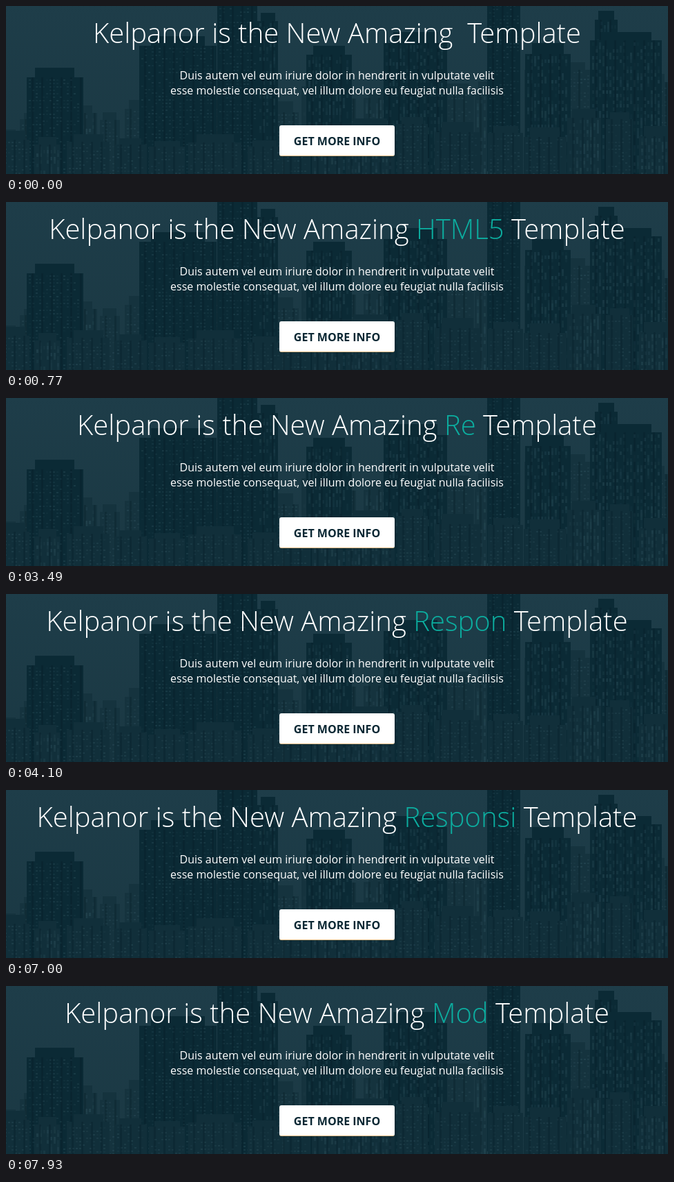
Write an HTML page with a canvas that moves like this. It is 959 px wide and 245 px high and loops after 8 s.

```html
<!DOCTYPE html>
<html lang="en">
<head>
<meta charset="utf-8">
<title>Banner with a typed word</title>
<style>
  html, body { margin: 0; width: 100%; height: 100%; overflow: hidden; }
  body { position: relative; background: #1c3a46; color: #fff; font-family: "Open Sans", sans-serif; }
  canvas { position: absolute; left: 0; top: 0; }
  h1, p, .button { position: absolute; margin: 0; text-align: center; white-space: pre; }
  h1 { left: 0; top: 11px; width: 959px; font-size: 40px; font-weight: 300; line-height: 55px; }
  h1 span { color: #0cad9f; }
  p { left: 0; top: 90px; width: 959px; font-size: 16px; line-height: 22px; }
  .button {
    left: 396px; top: 174px; width: 167px; height: 45px; box-sizing: border-box;
    border-bottom: 1px solid #e5bd85; border-radius: 3px;
    background: #fff; color: #0a2733; font-size: 16px; font-weight: 700; line-height: 46px;
  }
</style>
</head>
<body>
<canvas id="city" width="959" height="245"></canvas>
<h1>Kelpanor is the New Amazing <span id="word"></span> Template</h1>
<p>Duis autem vel eum iriure dolor in hendrerit in vulputate velit
esse molestie consequat, vel illum dolore eu feugiat nulla facilisis</p>
<div class="button">GET MORE INFO</div>
<script>
const WIDTH = 959, HEIGHT = 245, LOOP = 8000;

// Letters appear every `pace` ms; erasing begins with `left` letters and runs down evenly.
const WORDS = [
  { text: 'HTML5', from: 150, pace: 153, erase: 3020, left: 2, gone: 3180 },
  { text: 'Responsive', from: 3330, pace: 153, erase: 7000, left: 8, gone: 7390 },
  { text: 'Mod', from: 7540, pace: 190, erase: LOOP, left: 0, gone: LOOP }
];

function typedText(time) {
  const word = WORDS.findLast(({ from }) => time >= from);
  if (!word || time >= word.gone) return '';
  const { text, from, pace, erase, left, gone } = word;
  const count = time < erase
    ? Math.floor((time - from) / pace) + 1
    : Math.ceil(left * (gone - time) / (gone - erase));
  return text.slice(0, count);
}

function seededRandom(seed) {
  return () => (seed = (seed * 16807) % 2147483647) / 2147483647;
}

function drawCity(g) {
  const random = seededRandom(29);
  const between = (low, high) => low + random() * (high - low);
  const rect = (color, x, y, w, h) => {
    g.fillStyle = color;
    g.fillRect(Math.round(x), Math.round(y), Math.round(w), Math.round(h));
  };

  function tower(x, top, width, color) {
    const step = between(8, 16);
    rect(color, x + width * .15, top, width * .7, HEIGHT);
    rect(color, x, top + step, width, HEIGHT);
    const vertical = random() < .4;
    for (let y = top + step + 3; y < HEIGHT; y += 5) {
      for (let wx = x + 3; wx < x + width - 4; wx += 5) {
        if (random() < .5) rect(`rgba(66,104,116,${between(.05, .25)})`, wx, y, 3, vertical ? 5 : 2);
      }
    }
    for (let wx = x + 7; wx < x + width - 4; wx += 14) rect('rgba(4,28,38,.3)', wx, top + step, 3, HEIGHT);
  }

  function row(top, spread, low, high, color) {
    for (let x = -10; x < WIDTH; ) {
      const width = between(low, high);
      tower(x, top(x) + between(-spread, spread), width, color);
      x += width + between(0, 12);
    }
  }

  const sky = g.createLinearGradient(0, 0, 0, HEIGHT);
  sky.addColorStop(0, '#1e3d49');
  sky.addColorStop(1, '#1a3843');
  rect(sky, 0, 0, WIDTH, HEIGHT);

  row(x => 165 - Math.min(x, 700) * .1, 22, 28, 60, '#15333e');
  const landmarks = [
    [30, 90, 82], [193, 44, 112], [306, -16, 58], [364, 10, 30],
    [435, 58, 66], [547, 38, 92], [697, -16, 48], [752, 54, 66],
    [853, 7, 33], [846, 38, 104]
  ];
  for (const [x, top, width] of landmarks) tower(x, top, width, '#0b2a35');
  row(x => 198 - x * .04, 18, 36, 78, '#112f3a');
}

const word = document.getElementById('word');
const start = performance.now();

function render() {
  const text = typedText((performance.now() - start) % LOOP);
  if (word.textContent !== text) word.textContent = text;
  requestAnimationFrame(render);
}

drawCity(document.getElementById('city').getContext('2d'));
render();
</script>
</body>
</html>
```
